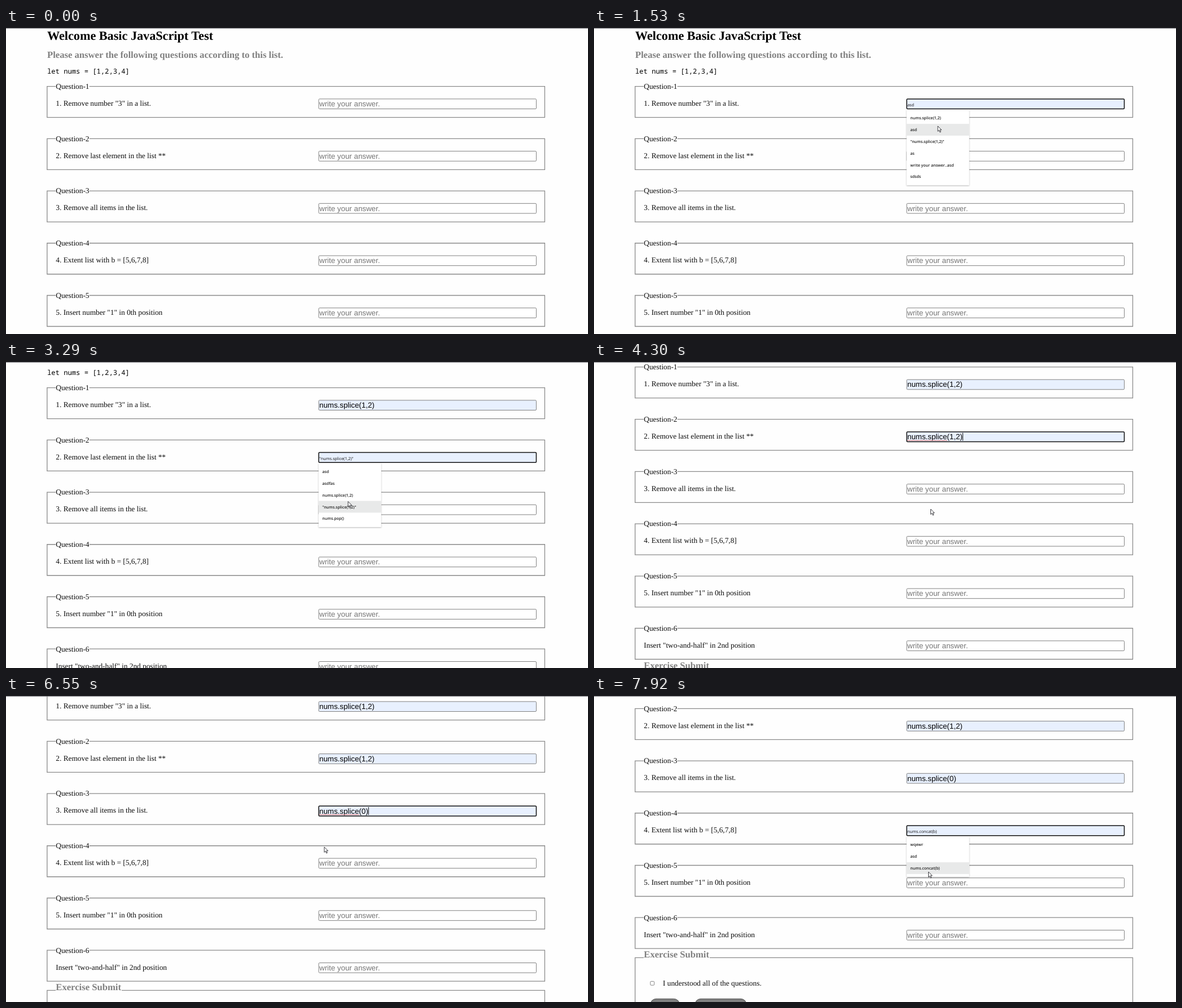
An HTML page for the animation above (8000 ms loop, 1031 by 543 pixels).

```html
<!DOCTYPE html>
<html lang="en">
<head>
<meta charset="utf-8">
<title>JavaScript Test</title>
<style>
  html, body { margin: 0; width: 100%; height: 100%; overflow: hidden; background: #fefefe; }
  svg { display: block; width: 1031px; height: 543px; text-rendering: geometricPrecision; }
  text { font: 13.34px "Liberation Serif", "Times New Roman", serif; fill: #0c0c0c; white-space: pre; }
  .h1 { font-size: 22.2px; font-weight: bold; fill: #000; }
  .h2 { font-size: 16.65px; font-weight: bold; fill: #808080; }
  .code { font: 500 12.17px "Noto Sans Mono", "DejaVu Sans Mono", monospace; fill: #000; }
  .value { font: 13.34px "Liberation Sans", Arial, sans-serif; fill: #000; }
  .hint { fill: #757575; }
  .preview { font: 500 7.3px "Open Sans", "Noto Sans", sans-serif; fill: #111; }
  .item { font: 600 7px "Open Sans", "Noto Sans", sans-serif; fill: #1c1c1c; }
  .frame { fill: none; stroke: #8a8a8a; stroke-width: 1.3; }
  .popup { filter: drop-shadow(0 1px 1.3px rgba(0, 0, 0, .28)); }
</style>
</head>
<body>
<svg id="stage" viewBox="0 0 1031 543" xmlns="http://www.w3.org/2000/svg"></svg>
<script>
const LOOP = 8000, TICK = 1000 / 15;
const PITCH = 92.72, ROW = 20.83, NOTCH = 58, SCROLL_MS = 164, OPEN_DELAY = 70, MOVE_MS = 450;
const HINT = "write your answer.";

// focus: click into the input, pick: click on a suggestion
const questions = [
  { text: '1. Remove number "3" in a list.', focus: 520, pick: 1860, value: "nums.splice(1,2)",
    items: ["nums.splice(1,2)", "asd", '"nums.splice(1,2)"', "as", "write your answer..asd", "sdsds"] },
  { text: "2. Remove last element in the list **", focus: 2530, pick: 3730, value: "nums.splice(1,2)",
    items: ["asd", "asdfas", "nums.splice(1,2)", '"nums.splice(1,2)"', "nums.pop()"] },
  { text: "3. Remove all items in the list.", focus: 5020, pick: 6180, value: "nums.splice(0)",
    items: ["asdfa", "asd", "nums.splice(0)"] },
  { text: "4. Extent list with b = [5,6,7,8]", focus: 7390, pick: Infinity, value: "",
    items: ["wqewr", "asd", "nums.concat(b)"] },
  { text: '5. Insert number "1" in 0th position', items: [] },
  { text: 'Insert "two-and-half" in 2nd position', items: [] }
];

// start time of each wheel notch
const notches = [2010, 4170, 6620];

// where the pointer comes to rest: arrival time, x, y
const stops = [
  [0, 1045, 565], [530, 630, 129], [1520, 609, 174], [1660, 607, 160],
  [2500, 605, 168], [3260, 606, 247.5], [3540, 604, 238], [4200, 596.5, 261],
  [4900, 582, 202], [5520, 587, 213.8], [5880, 585, 271],
  [6860, 470, 254.5], [7270, 585, 239], [7920, 592.5, 312]
];

function add(parent, tag, attrs = {}, content = "") {
  const el = document.createElementNS("http://www.w3.org/2000/svg", tag);
  for (const key in attrs) el.setAttribute(key, attrs[key]);
  el.textContent = content;
  return parent.appendChild(el);
}
const label = (parent, x, y, content, cls = "") => add(parent, "text", { x, y, class: cls }, content);
const show = (el, on) => el.setAttribute("visibility", on ? "visible" : "hidden");
const ease = p => p <= 0 ? 0 : p >= 1 ? 1 : p * p * (3 - 2 * p);
const fieldset = (y, gapEnd, height) =>
  add(page, "path", { class: "frame", d: `M${gapEnd} ${y}H954.4v${height}H72.8V${y}H88` });

const stage = document.getElementById("stage");
const page = add(stage, "g");

label(page, 73, 20.6, "Welcome Basic JavaScript Test", "h1");
label(page, 73, 53, "Please answer the following questions according to this list.", "h2");
label(page, 73, 80.6, "let nums = [1,2,3,4]", "code");

questions.forEach((q, i) => {
  const top = 103.6 + PITCH * i;
  q.mid = top + 31;
  fieldset(top, 147.6, 55);
  label(page, 88.3, top + 4.4, `Question-${i + 1}`);
  label(page, 88.3, top + 34.3, q.text);
  q.box = add(page, "rect", { x: 554, y: q.mid - 8.7, width: 385.4, height: 17.6, rx: 1.5 });
  q.label = label(page, 555, q.mid + 4.6, HINT, "value hint");
  q.squiggle = add(page, "path", {
    d: `M555 ${q.mid + 6.6}h70.3`, stroke: "#e2463f", "stroke-width": 1, "stroke-dasharray": "1.6 .7"
  });
  q.caret = add(page, "rect", { y: q.mid - 7, width: 1, height: 14, fill: "#000" });
});

// submit section
fieldset(638.4, 205, 160);
label(page, 88.3, 638.4, "Exercise Submit", "h2");
add(page, "rect", { x: 99.9, y: 680.4, width: 6.8, height: 6.8, rx: 1.3, fill: "#fff", stroke: "#767676", "stroke-width": .9 });
label(page, 122, 687.8, "I understood all of the questions.");
for (const [x, width] of [[100, 51.5], [179, 91]])
  add(page, "rect", { x, y: 711.4, width, height: 24, rx: 10, fill: "#808080", stroke: "#4c4c4c", "stroke-width": 1 });

// suggestion lists
for (const q of questions) {
  const top = q.mid + 10.3, height = q.items.length * ROW + 9.2;
  q.rows = top + 4.4;
  q.bottom = top + height;
  q.popup = add(page, "g");
  add(q.popup, "rect", { class: "popup", x: 553.7, y: top, width: 111, height, fill: "#fff" });
  q.mark = add(q.popup, "rect", { x: 553.7, width: 111, height: ROW, fill: "#e8e9e9" });
  q.items.forEach((item, k) => label(q.popup, 560.3, q.rows + ROW * k + 13, item, "item"));
}

add(stage, "rect", { width: 1031, height: 1, fill: "#75757a" });
const arrow = add(stage, "path", {
  d: "M0 0V9.4L2.2 7.4L3.8 11L5.4 10.3L3.8 6.8H6.7Z", fill: "#fff", stroke: "#26262c", "stroke-width": .9
});
const beam = add(stage, "path", {
  d: "M-2-5.5H2M0-5.5V5.5M-2 5.5H2", fill: "none", stroke: "#222", "stroke-width": 1
});

const scrollAt = t => NOTCH * notches.reduce((sum, start) => sum + ease((t - start) / SCROLL_MS), 0);
const isOpen = (q, t) => t >= q.focus + OPEN_DELAY && t < q.pick;

function pointerAt(t) {
  let [last, x, y] = stops[0];
  for (const [arrive, toX, toY] of stops.slice(1)) {
    const p = ease(1 - (arrive - t) / Math.min(MOVE_MS, .6 * (arrive - last)));
    x += (toX - x) * p;
    y += (toY - y) * p;
    last = arrive;
  }
  return [x, y];
}

function drawInput(q, next, t, x, y) {
  const focused = t >= q.focus && !(next && t >= next.focus);
  const open = isOpen(q, t);
  const picked = t >= q.pick;
  const row = Math.floor((y - q.rows) / ROW);
  const hover = open && row in q.items && x > 553 && x < 665;
  const content = picked ? q.value : hover ? q.items[row] : HINT;

  if (q.label.textContent !== content) q.label.textContent = content;
  q.label.setAttribute("class", picked ? "value" : hover ? "preview" : "value hint");
  q.box.setAttribute("fill", picked || hover ? "#e8f0fe" : "#fff");
  q.box.setAttribute("stroke", focused ? "#101010" : "#808080");
  q.box.setAttribute("stroke-width", focused ? 1.5 : 1);
  show(q.squiggle, picked && focused);

  const since = t - (picked ? q.pick + 50 : q.focus);
  const blink = focused && !hover && since % 1000 < 500;
  show(q.caret, blink);
  if (blink) q.caret.setAttribute("x", picked ? 555 + q.label.getComputedTextLength() : 555.2);

  show(q.popup, open);
  show(q.mark, hover);
  if (hover) q.mark.setAttribute("y", q.rows + row * ROW);
}

function render(time) {
  // the screen refreshes fifteen times a second
  const t = Math.floor((time % LOOP + 15) / TICK) * TICK % LOOP;
  const scroll = scrollAt(t);
  const [x, y] = pointerAt(t);
  const pageY = y + scroll;

  page.setAttribute("transform", `translate(0 ${-scroll})`);
  questions.forEach((q, i) => drawInput(q, questions[i + 1], t, x, pageY));

  const overPopup = questions.some(q => isOpen(q, t) && x < 665 && pageY > q.mid + 10 && pageY < q.bottom);
  const overInput = !overPopup && x > 554 && x < 940 && questions.some(q => Math.abs(pageY - q.mid) < 9);
  for (const el of [arrow, beam]) el.setAttribute("transform", `translate(${x} ${y})`);
  show(arrow, !overInput);
  show(beam, overInput);
}

const start = performance.now();
function loop() {
  render(performance.now() - start);
  requestAnimationFrame(loop);
}
loop();
</script>
</body>
</html>
```
